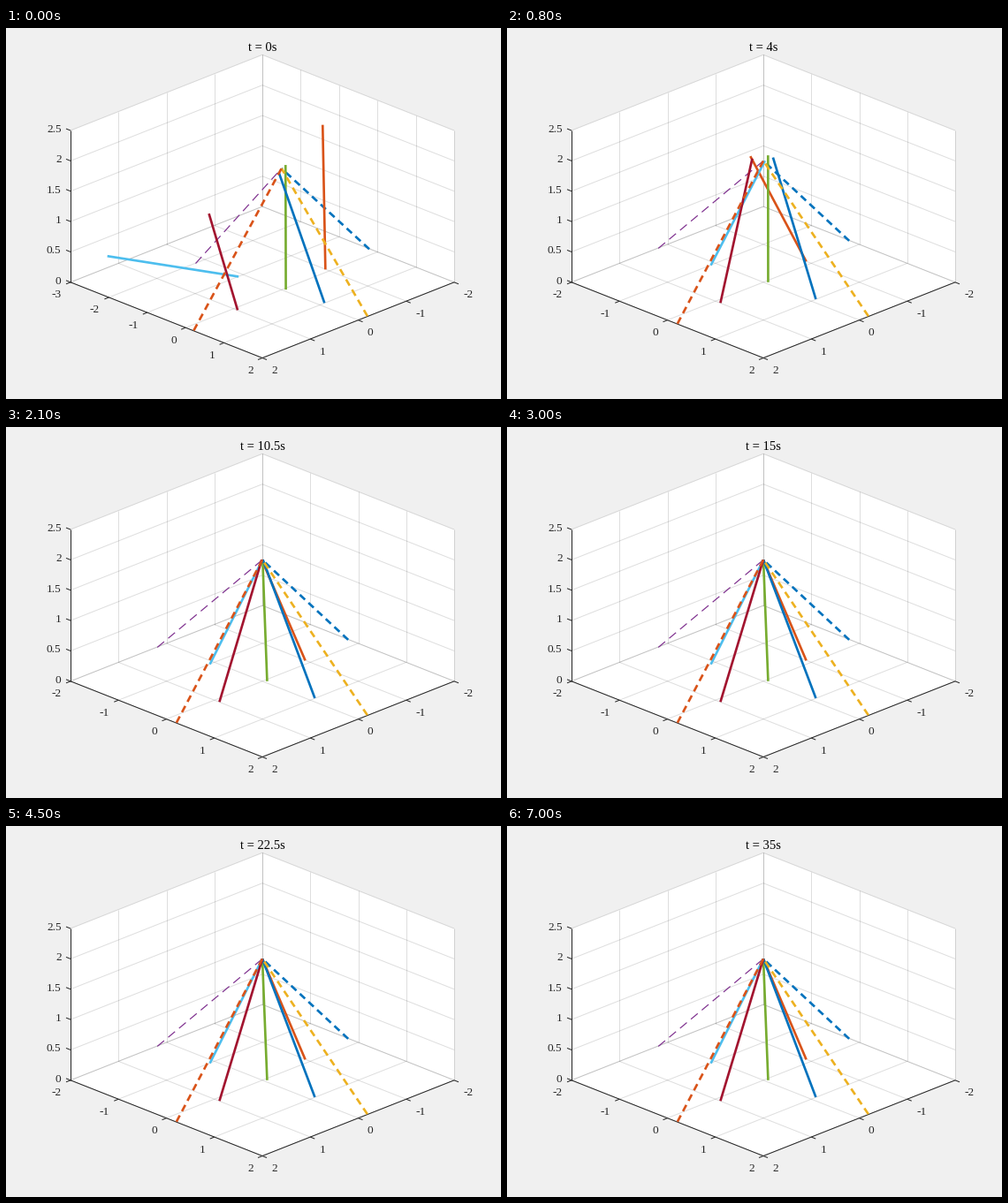
These frames come from a looping animation (560x420 px, 7.1 s). A matplotlib script:

```python
import numpy as np
import matplotlib.pyplot as plt
from matplotlib.animation import FuncAnimation

W, H, DPI = 560, 420, 100
FRAMES, INTERVAL = 71, 100
PT = 72 / DPI  # points per pixel
INK = "#262626"
APEX = np.array([0, 0, 2.0])
THICK, THIN = 2.67, 1.2

BLUE, ORANGE, YELLOW, PURPLE = "#0072BD", "#D95319", "#EDB120", "#7E2F8E"
GREEN, CYAN, RED = "#77AC30", "#4DBEEE", "#A2142F"


def foot_at(quarter, radius):
    """Floor point on a circle, in quarter turns from a slightly twisted x axis."""
    a = quarter * np.pi / 2 - 0.1
    return np.array([radius * np.cos(a), radius * np.sin(a), 0])


LEGS = [(color, foot_at(k, 2))
        for k, color in enumerate([YELLOW, ORANGE, PURPLE, BLUE])]

# Colour, foot, then the tip's floor-plan offset from the apex:
# where it starts, and how far it sways at 2.5 s
RODS = [
    (BLUE, foot_at(0, 1), (0.24, 0.25), (0.1, -0.21)),
    (RED, foot_at(1, 1), (0.52, 1.93), (-0.1, 0.25)),
    (CYAN, foot_at(2, 1), (-2.79, 1.4), (0.02, -0.05)),
    (ORANGE, foot_at(3, 1), (-0.59, -1.33), (-0.41, 0.01)),
    (GREEN, np.array([0.05, -0.05, 0]), (-0.07, -0.14), (-0.18, -0.33)),
]


def rod_tip(foot, start, sway, t):
    """Tip settling on the apex; its height follows from the rod's fixed length."""
    fade = np.exp(-1.5 * t)
    swell = t / 2.5 * np.exp(-0.6 * (t - 2.5))
    xy = np.array(start) * fade + np.array(sway) * swell
    reach = np.sum((xy - foot[:2]) ** 2)
    z = np.sqrt(max(np.sum((APEX - foot) ** 2) - reach, 0))
    return np.array([*xy, z])


def project(p, xmin):
    x, y, z = p
    u = (x - xmin) / (2 - xmin)
    v = (2 - y) / 4
    return 73 + 217 * (u + v), 288 + 85.7 * (u - v) - 68.7 * z


def line(a, b, color, width=1.0, **kw):
    ax.plot([a[0], b[0]], [a[1], b[1]], color=color, lw=width * PT,
            solid_capstyle="butt", **kw)


def label(x, y, text, ha, size=13.33, color=INK):
    ax.text(x, y, text, ha=ha, va="center_baseline", color=color,
            fontsize=size * PT, family="Liberation Serif")


def draw_box(xmin):
    def at(x, y, z):
        return project((x, y, z), xmin)

    def grid(a, b):
        line(at(*a), at(*b), INK, alpha=0.15)

    outline = [at(xmin, 2, 0), at(2, 2, 0), at(2, -2, 0),
               at(2, -2, 2.5), at(xmin, -2, 2.5), at(xmin, 2, 2.5)]
    ax.fill(*zip(*outline), color="white", lw=0)
    line(outline[0], outline[5], INK)
    line(outline[0], outline[1], INK)
    line(outline[1], outline[2], INK)

    for x in range(xmin, 3):
        grid((x, -2, 0), (x, 2, 0))
        grid((x, -2, 0), (x, -2, 2.5))
        px, py = at(x, 2, 0)
        line((px, py), (px - 5, py + 2), INK)
        label(px - 10.4, py + 13, str(x), "right")
    for y in range(-2, 3):
        grid((xmin, y, 0), (2, y, 0))
        grid((xmin, y, 0), (xmin, y, 2.5))
        px, py = at(2, y, 0)
        line((px, py), (px + 5, py + 2), INK)
        label(px + 10.4, py + 13, str(y), "left")
    for z in np.arange(0, 2.6, 0.5):
        grid((xmin, -2, z), (xmin, 2, z))
        grid((xmin, -2, z), (2, -2, z))
        px, py = at(xmin, 2, z)
        line((px, py), (px - 5, py - 2), INK)
        label(px - 10.4, py - 2.5, f"{z:g}", "right")


def draw(i):
    t = i / 2
    ax.clear()
    ax.set_axis_off()
    ax.set(xlim=(0, W), ylim=(H + 0.2, 0.2))

    tips = [rod_tip(foot, start, sway, t) for _, foot, start, sway in RODS]
    xmin = min(-2, int(np.floor(min(tip[0] for tip in tips))))
    draw_box(xmin)

    bars = [(foot, APEX, color, True) for color, foot in LEGS]
    bars += [(rod[1], tip, rod[0], False) for rod, tip in zip(RODS, tips)]
    bars.sort(key=lambda bar: bar[0].sum())  # far to near
    for foot, tip, color, dashed in bars:
        width = THIN if color == PURPLE else THICK
        on, off = (10, 6) if width == THIN else (3 * width, 2 * width)
        style = (0, (on / width / PT * PT, off / width)) if dashed else "-"
        line(project(foot, xmin), project(tip, xmin), color, width,
             linestyle=style)

    label(290, 21, f"t = {t:g}s", "center", 14.67, "black")
    return []


fig = plt.figure(figsize=(W / DPI, H / DPI), dpi=DPI, facecolor="#F0F0F0")
ax = fig.add_axes([0, 0, 1, 1])
anim = FuncAnimation(fig, draw, frames=FRAMES, init_func=lambda: [],
                     interval=INTERVAL, repeat=True, repeat_delay=0)
plt.show()
```
